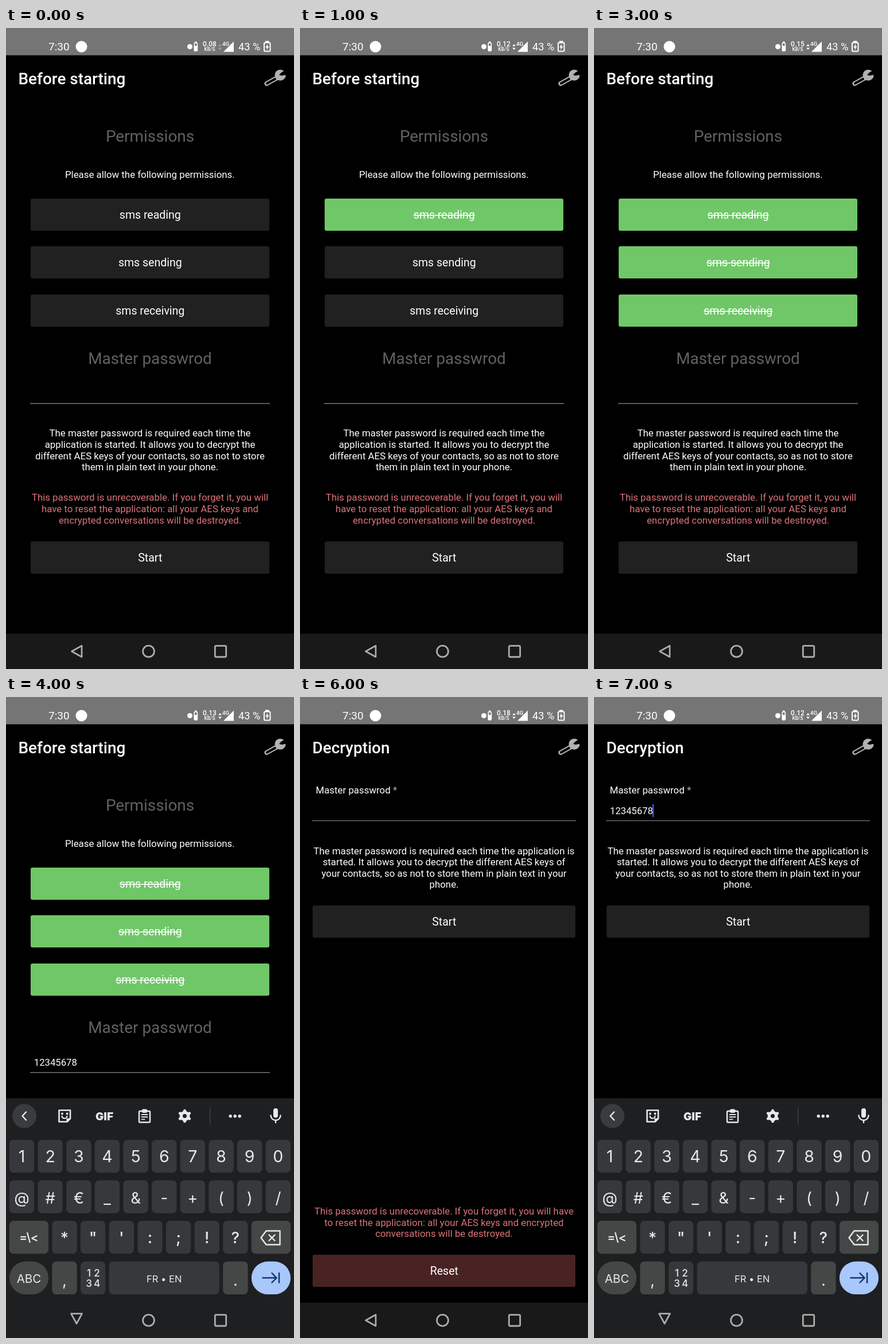
Write an HTML page with a canvas that moves like this. It is 502 px wide and 1116 px high and loops after 8000 ms.

```html
<!DOCTYPE html>
<html lang="en">
<head>
<meta charset="utf-8">
<title>Permission setup</title>
<style>
html, body { margin: 0; width: 100%; height: 100%; overflow: hidden; background: #000; }
canvas { display: block; width: 502px; height: 1116px; }
</style>
</head>
<body>
<canvas id="stage" width="502" height="1116"></canvas>
<script>
const ctx = document.getElementById('stage').getContext('2d');
const UI = 'Roboto, sans-serif';
const KEYS = 'Inter, sans-serif';
const WHITE = '#fff', RED = '#dc7479', GREEN = '#6fc768', DARK = '#212121';
const KEY = '#37383c', SPECIAL = '#444746', ICON = '#e8e9ec';
const BODY = 16.85, LINE = 19.6;
const STEP = 1000;

// One entry per second
const steps = [
  { rate: '0.08', idle: true, granted: 0 },
  { rate: '0.12', granted: 1 },
  { rate: '0.12', granted: 2 },
  { rate: '0.15', granted: 3 },
  { rate: '0.13', granted: 3, typed: true, keyboard: true },
  { rate: '0.18', granted: 3, typed: true, caret: true },
  { rate: '0.18', locked: true },
  { rate: '0.12', locked: true, typed: true, caret: true, keyboard: true }
];

function text(str, x, y, size, { color = WHITE, weight = 400, align = 'center', font = UI } = {}) {
  ctx.font = `${weight} ${size}px ${font}`;
  ctx.textAlign = align;
  ctx.fillStyle = color;
  ctx.fillText(str, x, y);
}

function lines(rows, y, color) {
  rows.forEach((row, i) => text(row, 251, y + i * LINE, BODY, { color }));
}

function rect(x, y, w, h, color, r = 0) {
  ctx.fillStyle = color;
  ctx.beginPath();
  ctx.roundRect(x, y, w, h, r);
  ctx.fill();
}

function disc(x, y, r, color) {
  ctx.fillStyle = color;
  ctx.beginPath();
  ctx.arc(x, y, r, 0, Math.PI * 2);
  ctx.fill();
}

function pen(color, width) {
  ctx.strokeStyle = color;
  ctx.lineWidth = width;
  ctx.lineCap = ctx.lineJoin = 'round';
}

function trace(points, close) {
  ctx.beginPath();
  points.forEach(([x, y]) => ctx.lineTo(x, y));
  if (close) ctx.closePath();
}

function stroke(points, color, width, close) {
  pen(color, width);
  trace(points, close);
  ctx.stroke();
}

function fill(points, color) {
  ctx.fillStyle = color;
  trace(points, true);
  ctx.fill();
}

function arc(x, y, r, from, to, color, width) {
  pen(color, width);
  ctx.beginPath();
  ctx.arc(x, y, r, from, to);
  ctx.stroke();
}

function box(x, y, w, h, r, color, width) {
  pen(color, width);
  ctx.beginPath();
  ctx.roundRect(x, y, w, h, r);
  ctx.stroke();
}

function statusBar({ rate, idle }) {
  rect(0, 0, 502, 47.5, '#757575');
  text('7:30', 74, 39, 19, { align: 'left' });
  disc(131.5, 32.5, 10, WHITE);
  disc(320.5, 32.5, 4.5, WHITE);
  rect(329, 23.5, 3.5, 3, WHITE);
  box(328.2, 26, 5.2, 14, 1.5, WHITE, 1.6);
  rect(328, 31, 5.5, 9, WHITE, 1);
  text(rate, 355, 31.8, 12, { weight: 500 });
  text('KB/S', 355, 40.3, 8.4, { weight: 500 });
  const arrow = idle ? '#a8a8a8' : WHITE;
  fill([[370, 31.5], [373, 28], [376, 31.5]], arrow);
  fill([[370, 34.5], [373, 38], [376, 34.5]], arrow);
  fill([[379, 41.5], [397, 41.5], [397, 23.5]], WHITE);
  text('4G', 383, 31, 9.8, { weight: 500 });
  text('43 %', 405, 39, 18.2, { align: 'left' });
  rect(452, 22.5, 6.5, 3, WHITE);
  box(450, 25.5, 10.5, 15, 1.5, WHITE, 2);
  fill([[456.3, 27.5], [452.2, 34], [454.8, 34], [454.2, 38.5], [458.5, 32], [455.8, 32]], WHITE);
}

function wrench() {
  const grey = '#b2b2b2';
  stroke([[472, 87], [454.5, 96.8]], grey, 8);
  stroke([[469, 88.7], [455, 96.5]], '#000', 4);
  disc(478, 82, 9.6, grey);
  fill([[476, 81.5], [480, 77.5], [491, 71], [491, 81], [480, 83]], '#000');
}

function header(title, state) {
  statusBar(state);
  text(title, 21.5, 97.5, 27.9, { weight: 500, align: 'left' });
  wrench();
}

function button(label, x, y, w, color = DARK, struck = false) {
  rect(x, y, w, 56, color, 3);
  const base = y + 34.6;
  text(label, 251.3, base, 19.5);
  if (struck) {
    const width = ctx.measureText(label).width;
    rect(251.3 - width / 2, base - 6, width, 1.3, WHITE);
  }
}

function field(x, y, w, textX, { typed, caret }) {
  rect(x, y, w, 1.4, '#777');
  if (!typed) return;
  text('12345678', textX, y - 10.7, 16.7, { align: 'left' });
  if (caret) rect(textX + ctx.measureText('12345678').width - 1, y - 28, 2.4, 22.5, '#4854dc');
}

function setupScreen(state) {
  header('Before starting', state);
  text('Permissions', 251, 197.5, 27.9, { color: '#616161' });
  text('Please allow the following permissions.', 250.8, 261, BODY);
  ['reading', 'sending', 'receiving'].forEach((name, i) => {
    const done = i < state.granted;
    button('sms ' + name, 43, Math.round(296.7 + i * 83.6), 416, done ? GREEN : DARK, done);
  });
  text('Master passwrod', 251, 584.5, 27.9, { color: '#616161' });
  field(42, 653, 418, 48.8, state);
  lines([
    'The master password is required each time the',
    'application is started. It allows you to decrypt the',
    'different AES keys of your contacts, so as not to store',
    'them in plain text in your phone.'
  ], 711.3);
  lines([
    'This password is unrecoverable. If you forget it, you will',
    'have to reset the application: all your AES keys and',
    'encrypted conversations will be destroyed.'
  ], 823.4, RED);
  button('Start', 43, 894, 416);
}

function unlockScreen(state) {
  header('Decryption', state);
  text('Master passwrod ', 27.5, 167.8, BODY, { align: 'left' });
  const end = 27.5 + ctx.measureText('Master passwrod ').width;
  text('*', end, 167.8, BODY, { align: 'left', color: '#aaa' });
  field(21, 214.7, 460, 27.8, state);
  lines([
    'The master password is required each time the application is',
    'started. It allows you to decrypt the different AES keys of',
    'your contacts, so as not to store them in plain text in your',
    'phone.'
  ], 273.5);
  button('Start', 22, 363, 458);
  lines([
    'This password is unrecoverable. If you forget it, you will have',
    'to reset the application: all your AES keys and encrypted',
    'conversations will be destroyed.'
  ], 901, RED);
  button('Reset', 22, 971, 458, '#492324');
}

function toolbar() {
  disc(32, 729.5, 21, '#3a3b3f');
  stroke([[35, 722.5], [28.5, 729.5], [35, 736.5]], ICON, 2.4);

  stroke([[92.5, 719.5], [112, 719.5], [112, 734], [106.5, 739.5], [92.5, 739.5]], ICON, 2.6, true);
  fill([[105.5, 740], [105.5, 733.5], [112, 733.5]], ICON);
  disc(98, 725.5, 1.9, ICON);
  disc(106.5, 725.5, 1.9, ICON);
  arc(102, 729, 4.6, 0.2, Math.PI - 0.2, ICON, 2.2);

  text('GIF', 171.5, 736.5, 19, { weight: 900, font: KEYS, color: ICON });

  box(232, 721, 19, 19.5, 1.5, ICON, 2.5);
  rect(236.5, 717.5, 10, 6.5, ICON, 3);
  [14, 14, 9].forEach((w, i) => stroke([[236.5, 727 + i * 4.2], [232.5 + w, 727 + i * 4.2]], ICON, 1.9));

  arc(311.5, 729.5, 6.2, 0, Math.PI * 2, ICON, 5.4);
  for (let i = 0; i < 6; i++) {
    const a = Math.PI / 6 + i * Math.PI / 3;
    const at = r => [311.5 + r * Math.cos(a), 729.5 + r * Math.sin(a)];
    stroke([at(7.5), at(9.3)], ICON, 5);
  }

  rect(355, 714, 1.2, 31, '#47484b');
  for (let i = -1; i < 2; i++) disc(399.2 + i * 8, 729.7, 2.7, ICON);

  rect(466, 716, 8, 16.5, ICON, 4);
  arc(470, 728.5, 8.5, 0, Math.PI, ICON, 2.4);
  stroke([[470, 737], [470, 741]], ICON, 2.4);
}

function key(label, col, y, { span = 1, color = KEY, r = 7.5, size = 28, dy = 39, weight = 400 } = {}) {
  const x = 5.8 + col * 49.65;
  const w = 43.4 + (span - 1) * 49.65;
  rect(x, y - 0.3, w, 57.4, color, r);
  text(label, x + w / 2, y + dy, size, { font: KEYS, color: ICON, weight });
}

function keyboard() {
  rect(0, 698.5, 502, 417.5, '#1e1f21');
  toolbar();
  [...'1234567890'].forEach((c, i) => key(c, i, 771.2, { size: 28.5 }));
  [...'@#€_&-+()/'].forEach((c, i) => key(c, i, 841.7, { size: 27.5, dy: 39.8 }));

  const wide = { span: 1.5, color: SPECIAL };
  key('=\\<', 0, 912.2, { ...wide, size: 20.5, dy: 36, weight: 600 });
  [...'*"\':;!?'].forEach((c, i) => key(c, i + 1.5, 912.2, { size: 27.5, weight: 500 }));
  key('', 8.5, 912.2, wide);
  stroke([[444.5, 941.5], [453.5, 929.5], [477.5, 929.5], [477.5, 953.5], [453.5, 953.5]], ICON, 2.4, true);
  stroke([[458.5, 936.5], [468.5, 946.5]], ICON, 2.4);
  stroke([[468.5, 936.5], [458.5, 946.5]], ICON, 2.4);

  key('ABC', 0, 983, { ...wide, r: 28.7, size: 20.5, dy: 36.5 });
  key(',', 1.5, 983, { color: SPECIAL, size: 27.5, dy: 42 });
  key('', 2.5, 983);
  [...'1234'].forEach((c, i) => {
    text(c, 144.5 + (i % 2) * 14, 1008.5 + (i >> 1) * 18.5, 17, { font: KEYS, weight: 500, color: ICON });
  });
  key('FR • EN', 3.5, 983, { span: 4, size: 16.5, dy: 35.5 });
  key('.', 7.5, 983, { color: SPECIAL, size: 27.5, dy: 42 });
  key('', 8.5, 983, { span: 1.5, color: '#a8c7fa', r: 28.7 });
  const navy = '#17376f';
  stroke([[447.5, 1011.3], [471, 1011.3]], navy, 2.5);
  stroke([[463.5, 1003], [471.5, 1011.3], [463.5, 1019.5]], navy, 2.5);
  stroke([[476, 1003], [476, 1019.5]], navy, 2.5);
}

function navBar(open) {
  const grey = '#adadad';
  if (!open) rect(0, 1054.5, 502, 61.5, '#191919');
  const back = open
    ? [[113.5, 1073.7], [132.5, 1073.7], [123, 1091]]
    : [[114.5, 1085.3], [132, 1075.5], [132, 1095]];
  stroke(back, grey, 2.7, true);
  arc(248.5, 1085.3, 9.9, 0, Math.PI * 2, grey, 2.8);
  box(364.3, 1075.6, 19.4, 19.4, 2, grey, 2.8);
}

function draw(now) {
  const state = steps[Math.floor(now / STEP) % steps.length];
  rect(0, 0, 502, 1116, '#000');
  (state.locked ? unlockScreen : setupScreen)(state);
  if (state.keyboard) keyboard();
  navBar(state.keyboard);
}

let start;
function tick(now) {
  start ??= now;
  draw(Math.max(0, now - start));
  requestAnimationFrame(tick);
}
draw(0);
requestAnimationFrame(tick);
</script>
</body>
</html>
```
